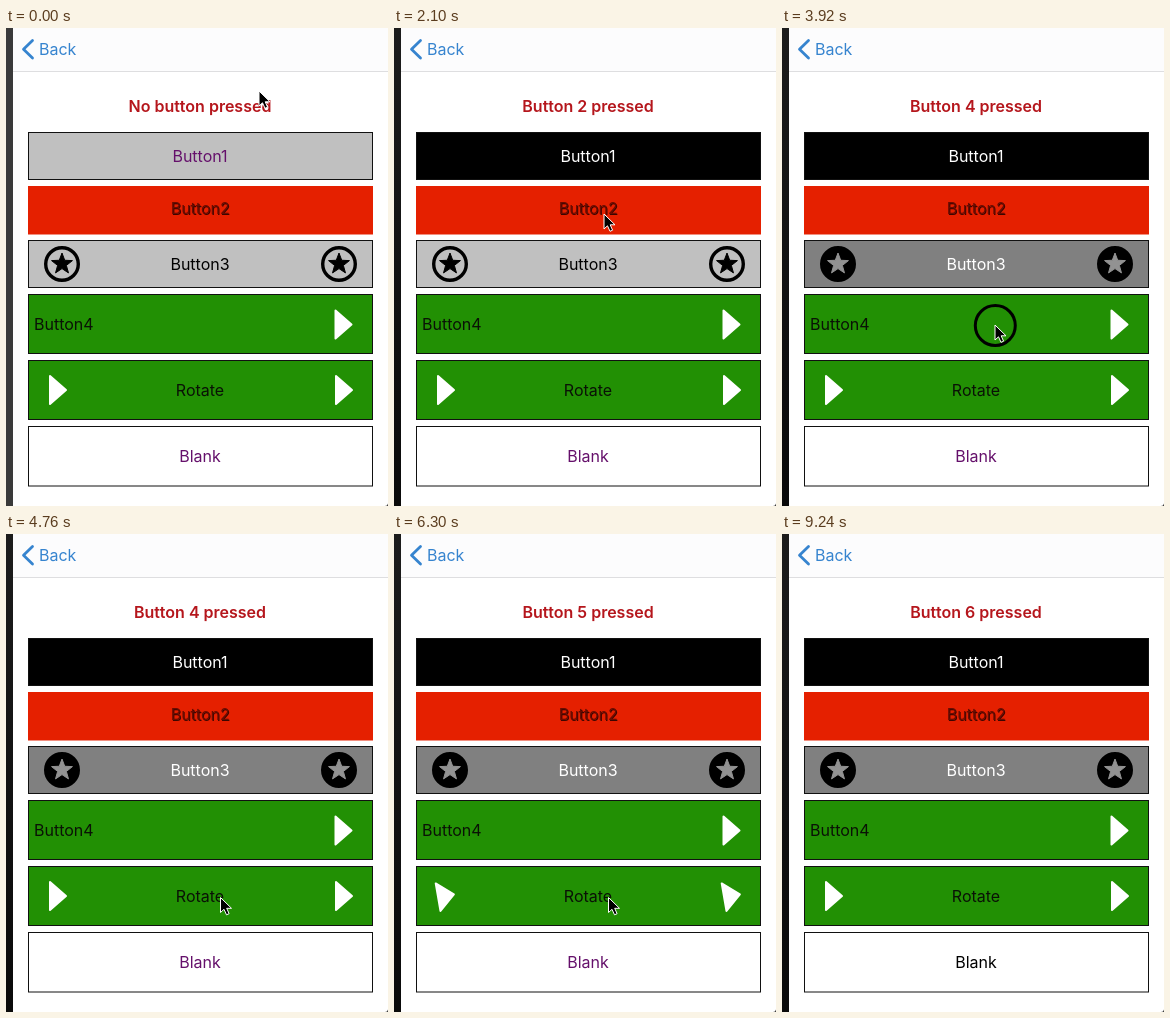
Animation, 382 px wide and 478 px high, one loop 9.45 s. Source, as an HTML page:

```html
<!DOCTYPE html>
<html lang="en">
<head>
<meta charset="utf-8">
<title>Buttons</title>
<style>
  html, body { margin: 0; width: 100%; height: 100%; overflow: hidden; background: #fff; }
  svg { display: block; width: 382px; height: 478px; }
  text { font: 16px Inter, "Open Sans", sans-serif; }
  .mid { text-anchor: middle; }
  .box { stroke: #111; stroke-width: 1; }
</style>
</head>
<body>
<svg viewBox="0 0 382 478">
  <defs>
    <linearGradient id="edge" x1="0" y1="0" x2="0" y2="1">
      <stop offset="0" stop-color="#1c1c1c"/>
      <stop offset="1" stop-color="#0a0a0a"/>
    </linearGradient>
    <filter id="soft"><feGaussianBlur stdDeviation="0.6"/></filter>
    <path id="tri" d="M-7 -14 L9 0 L-7 14 Z" fill="#fff" stroke="#fff" stroke-width="2" stroke-linejoin="round"/>
  </defs>
  <rect width="382" height="478" fill="#fff"/>
  <rect width="382" height="43" fill="#fcfcfd"/>
  <rect x="7" y="43" width="375" height="1" fill="#dedee0"/>
  <rect id="strip" width="7" height="478"/>
  <path d="M382 475.5V478H379Q381.5 478 382 475.5Z" fill="#333"/>

  <path d="M26.5 12.5L17.5 21.2L26.5 30" fill="none" stroke="#3684cf" stroke-width="2.8" stroke-linecap="round" stroke-linejoin="round"/>
  <text x="33" y="27" fill="#3684cf">Back</text>
  <text id="label" class="mid" x="194" y="84" fill="#b5161c" style="font-weight:600"></text>

  <rect id="b1" class="box" x="22.5" y="104.5" width="344" height="47"/>
  <text id="t1" class="mid" x="194" y="134">Button1</text>

  <rect x="22" y="158" width="345" height="48.5" fill="#e52000"/>
  <text class="mid" x="195" y="186.6" fill="#3a0500" filter="url(#soft)">Button2</text>
  <text class="mid" x="194.2" y="186" fill="#6a0c00">Button2</text>

  <rect id="b3" class="box" x="22.5" y="212.5" width="344" height="47"/>
  <g id="stars"></g>
  <text id="t3" class="mid" x="194" y="242">Button3</text>

  <rect class="box" x="22.5" y="266.5" width="344" height="59" fill="#229004"/>
  <text x="28" y="302" fill="#0a1206">Button4</text>
  <use href="#tri" x="336.5" y="296.5"/>

  <rect class="box" x="22.5" y="332.5" width="344" height="59" fill="#229004"/>
  <text class="mid" x="194" y="368" fill="#0a1206">Rotate</text>
  <use class="spin" href="#tri" data-x="51"/>
  <use class="spin" href="#tri" data-x="337"/>

  <rect class="box" x="22.5" y="398.5" width="344" height="59.5" fill="#fff"/>
  <text id="t6" class="mid" x="194" y="434">Blank</text>

  <circle id="ring" r="20" fill="none" stroke="#000" stroke-width="3"/>
  <path id="cursor" d="M0 0V15L3.5 11.8L6 17.3L8.6 16.2L6.2 10.8H11Z" fill="#000" stroke="#fff" stroke-width="1" stroke-linejoin="round"/>
</svg>
<script>
const LOOP = 9450, STEP = 70;
const PURPLE = '#65106b';
const $ = id => document.getElementById(id);
const set = (el, attrs) => { for (const k in attrs) el.setAttribute(k, attrs[k]); };
const ease = p => (1 - Math.cos(Math.PI * p)) / 2;
const progress = (t, start, len) => ease(Math.min(1, Math.max(0, (t - start) / len)));

// Pointer moves: start, end, x, y
const home = [253, 63];
const moves = [
  [0, 700, 211, 128],
  [1050, 1330, 208, 207],
  [1470, 1820, 210, 186],
  [2170, 2590, 212.5, 239.5],
  [3150, 3640, 213, 297],
  [4200, 4690, 214.5, 363.5],
  [6440, 7140, 220, 421.5],
  [8680, 9100, 219, 480]
];
// Ring visible: start, end
const rings = [
  [700, 910], [1890, 2100], [2800, 3010], [3780, 3990], [4900, 5110],
  [5810, 5950], [7280, 7490], [7840, 8050], [8400, 8610]
];
// Time at which each button reports its press
const presses = [840, 1960, 2940, 3920, 5040, 7350];
const turns = [5110, 5835], TURN = 520;

const starPath = (cx, cy, r) => {
  let d = '';
  for (let i = 0; i < 10; i++) {
    const a = (i / 5 - 0.5) * Math.PI, q = i % 2 ? r * 0.42 : r;
    d += (i ? 'L' : 'M') + (cx + q * Math.cos(a)).toFixed(2) + ' ' + (cy + q * Math.sin(a)).toFixed(2);
  }
  return d + 'Z';
};
$('stars').innerHTML = [56, 333].map(x =>
  `<circle class="disc" cx="${x}" cy="236" r="16.3" stroke="#000" stroke-width="3.4"/>
   <path class="star" d="${starPath(x, 236, 11)}" stroke-width="1" stroke-linejoin="round"/>`).join('');

const discs = document.querySelectorAll('.disc');
const stars = document.querySelectorAll('.star');
const spins = document.querySelectorAll('.spin');

function pointer(t) {
  let [x, y] = home;
  for (const [start, end, nx, ny] of moves) {
    const p = progress(t, start, end - start);
    x += (nx - x) * p;
    y += (ny - y) * p;
  }
  return [x, y];
}

function draw(t) {
  const count = presses.filter(p => t >= p).length;
  $('label').textContent = count ? `Button ${count} pressed` : 'No button pressed';
  set($('strip'), { fill: t < STEP ? '#3a3a3a' : 'url(#edge)' });

  set($('b1'), { fill: count >= 1 ? '#000' : '#c0c0c0' });
  set($('t1'), { fill: count >= 1 ? '#fff' : PURPLE });

  const on = count >= 3;
  set($('b3'), { fill: on ? '#808080' : '#c0c0c0' });
  set($('t3'), { fill: on ? '#fff' : '#000' });
  discs.forEach(el => set(el, { fill: on ? '#000' : 'none' }));
  stars.forEach(el => set(el, { fill: on ? '#929292' : '#000', stroke: on ? '#929292' : '#000' }));

  set($('t6'), { fill: count >= 6 ? '#000' : PURPLE });

  const angle = 360 * turns.reduce((sum, s) => sum + progress(t, s, TURN), 0);
  spins.forEach(el => set(el, { transform: `translate(${el.dataset.x} 362) rotate(${angle.toFixed(2)})` }));

  const [x, y] = pointer(t);
  const down = rings.some(([a, b]) => t >= a && t < b);
  set($('ring'), { cx: x + 0.3, cy: y + 0.5, visibility: down ? 'visible' : 'hidden' });
  set($('cursor'), { transform: `translate(${x} ${y})` });
}

const begin = performance.now();
function tick() {
  const t = (performance.now() - begin) % LOOP;
  draw(Math.floor(t / STEP) * STEP);
  requestAnimationFrame(tick);
}
draw(0);
requestAnimationFrame(tick);
</script>
</body>
</html>
```
